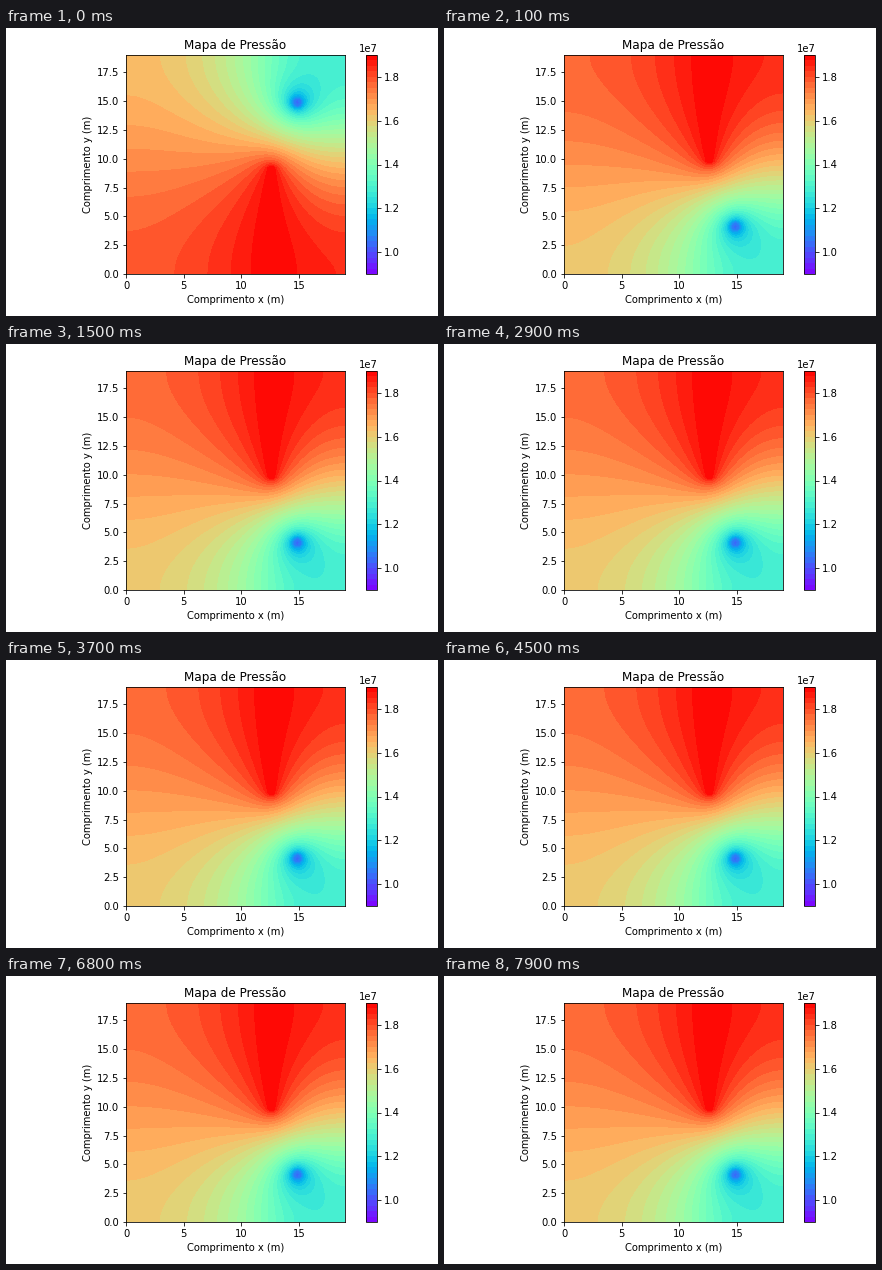
Animation of 432 by 288 pixels, one loop 8000 ms. Source, as a matplotlib script:

```python
import numpy as np
import matplotlib.pyplot as plt
from matplotlib.animation import FuncAnimation
from matplotlib.cm import ScalarMappable
from matplotlib.colors import ListedColormap, Normalize

W, H, DPI = 432, 288, 72
FRAMES, INTERVAL = 80, 100
N, SIZE = 65, 19
P_MIN, P_MAX, BANDS = 0.9e7, 1.9e7, 40
WELL = (14.84, 4.16)
CORNER_DROP, WELL_DROP = 0.29e7, 0.87e7
LAG, DECAY = 0.026e7, 0.3

axis = np.linspace(0, SIZE, N)
X, Y = np.meshgrid(axis, axis)
dist = np.hypot(X - WELL[0], Y - WELL[1])

# Injection line held at the highest pressure
line = np.zeros((N, N), bool)
line[33:, 42:44] = True


def solve(source, fixed, omega=1.954, sweeps=600):
    """Poisson equation with closed edges, zero on `fixed` (red-black SOR)."""
    u = np.zeros((N, N))
    i, j = np.indices((N, N))
    colours = [((i + j) % 2 == c) & ~fixed for c in (0, 1)]
    for _ in range(sweeps):
        for cells in colours:
            g = np.pad(u, 1, mode="reflect")
            mean = (g[2:, 1:-1] + g[:-2, 1:-1] + g[1:-1, 2:] + g[1:-1, :-2]) / 4
            u += omega * cells * (mean + source - u)
    return u


def drawdown(radius):
    """Pressure drop caused by a producing well of the given radius."""
    disc = (dist < radius).astype(float)
    u = solve(disc / disc.sum(), line)
    return CORNER_DROP * u / u[0, 0]


sharp, broad = drawdown(0.45), drawdown(1.3)
mix = (WELL_DROP - broad.max()) / (sharp.max() - broad.max())
mix = np.clip(mix, 0, 1.2)
steady = P_MAX - (mix * sharp + (1 - mix) * broad)

# Slowest part of the transient, gone after a few steps
lag = solve(np.full((N, N), 1e-3), line | (dist < 0.5))
lag *= LAG / lag[0, 0]


def pressure(k):
    p = np.clip(steady + lag * DECAY**k, 0.93e7, P_MAX - 1)
    return p[::-1] if k == 0 else p


levels = np.linspace(P_MIN, P_MAX, BANDS + 1)
colors = plt.get_cmap("rainbow")((np.arange(BANDS) + 0.5) / BANDS)

fig = plt.figure(figsize=(W / DPI, H / DPI), dpi=DPI, facecolor="white")
ax = fig.add_axes([120 / W, 42 / H, 219 / W, 219 / H])
cax = fig.add_axes([360.4 / W, 42 / H, 10.95 / W, 219 / H])

ax.set(xlim=(0, SIZE), ylim=(0, SIZE), title="Mapa de Pressão",
       xlabel="Comprimento x (m)", ylabel="Comprimento y (m)",
       xticks=np.arange(0, 16, 5), yticks=np.arange(0, 18, 2.5))
fig.colorbar(ScalarMappable(Normalize(P_MIN, P_MAX), ListedColormap(colors)),
             cax=cax, ticks=np.arange(1.0e7, 1.9e7, 0.2e7))

shown = []


def update(k):
    while shown:
        shown.pop().remove()
    shown.append(ax.contourf(X, Y, pressure(k), levels=levels, colors=colors))
    return shown


anim = FuncAnimation(fig, update, frames=FRAMES, interval=INTERVAL,
                     init_func=lambda: [], repeat=True, repeat_delay=0)
plt.show()
```
